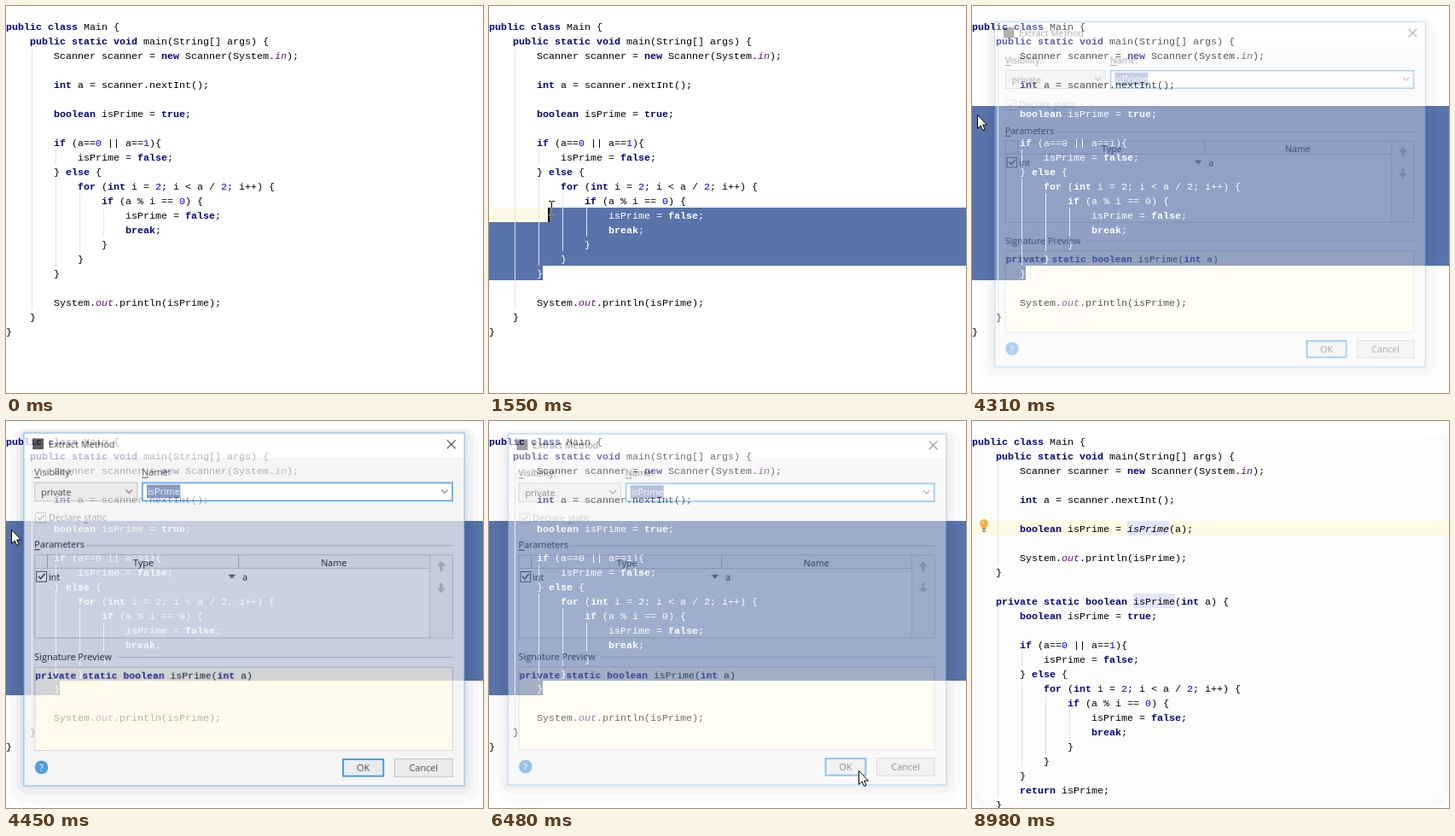
Animation of 559 by 453 pixels, one loop 9.04 s. Source, as an HTML page with a canvas:

```html
<!DOCTYPE html>
<html lang="en">
<head>
<meta charset="utf-8">
<title>Extract Method</title>
<style>
html, body { margin: 0; width: 100%; height: 100%; overflow: hidden; background: #fff; }
canvas { display: block; }
</style>
</head>
<body>
<canvas id="stage" width="559" height="453"></canvas>
<script>
const W = 559, H = 453, LOOP = 9040;
const COL = 7, ROW = 17, TOP = 15;
const MONO = '11.67px "Liberation Mono", monospace';
const UI = '11.1px "Open Sans", "Noto Sans", sans-serif';
const NAVY = '#000080', BLUE = '#5974ab', YELLOW = '#fffae3', FOCUS = '#0078d7';
const ctx = document.getElementById('stage').getContext('2d');

const head = [
  'public class Main {',
  '    public static void main(String[] args) {',
  '        Scanner scanner = new Scanner(System.in);',
  '',
  '        int a = scanner.nextInt();',
  ''
];
const body = [
  '        boolean isPrime = true;',
  '',
  '        if (a==0 || a==1){',
  '            isPrime = false;',
  '        } else {',
  '            for (int i = 2; i < a / 2; i++) {',
  '                if (a % i == 0) {',
  '                    isPrime = false;',
  '                    break;',
  '                }',
  '            }',
  '        }'
];
const print = '        System.out.println(isPrime);';
const before = {
  lines: [...head, ...body, '', print, '    }', '}'],
  // x, first row, last row
  guides: [[30, 2, 19], [58, 9, 9], [58, 11, 16], [86, 12, 15], [114, 13, 14]]
};
const after = {
  lines: [...head, '        boolean isPrime = isPrime(a);', '', print, '    }', '',
    '    private static boolean isPrime(int a) {', ...body,
    '        return isPrime;', '    }'],
  guides: [[30, 2, 8], [30, 12, 24], [58, 15, 15], [58, 17, 22], [86, 18, 21], [114, 19, 20]]
};

const TOKEN = /\b(public|class|static|void|new|int|boolean|true|false|if|else|for|break|return|private)\b|\b(in|out)\b|\b(\d)\b|(isPrime(?=\(a))|[^\s\w]+|\w+/g;
const rowY = r => TOP + r * ROW;

function rect(g, color, x, y, w, h) {
  g.fillStyle = color;
  g.fillRect(x, y, w, h);
}

function frame(g, fill, border, x, y, w, h, t = 1) {
  rect(g, border, x, y, w, h);
  rect(g, fill, x + t, y + t, w - 2 * t, h - 2 * t);
}

function line(g, color, width, ...pts) {
  g.strokeStyle = color;
  g.lineWidth = width;
  g.beginPath();
  for (let i = 0; i < pts.length; i += 2) g.lineTo(pts[i], pts[i + 1]);
  g.stroke();
}

function shape(g, color, ...pts) {
  g.fillStyle = color;
  g.beginPath();
  for (let i = 0; i < pts.length; i += 2) g.lineTo(pts[i], pts[i + 1]);
  g.closePath();
  g.fill();
}

function round(g, color, x, y, w, h, r) {
  g.fillStyle = color;
  g.beginPath();
  g.roundRect(x, y, w, h, r);
  g.fill();
}

function codeLine(g, text, x, y, color) {
  g.textAlign = 'left';
  g.textBaseline = 'alphabetic';
  for (const m of text.matchAll(TOKEN)) {
    const [word, key, field, num, call] = m;
    g.font = (key ? 'bold ' : field || call ? 'italic ' : '') + MONO;
    g.fillStyle = color || (key ? NAVY : field ? '#660e7a' : num ? '#0000ff' : '#000');
    g.fillText(word, x + m.index * COL, y);
  }
}

function drawCode(code, color) {
  for (const [x, a, b] of code.guides)
    rect(ctx, color ? '#e0e4ee' : '#e2e2e2', x, rowY(a), 1, (b - a + 1) * ROW);
  code.lines.forEach((s, r) => codeLine(ctx, s, 0, rowY(r) + 13, color));
}

// Selection runs from the caret down to the end of row 17.
function select(row, x) {
  const y = rowY(row), last = rowY(17);
  ctx.save();
  ctx.beginPath();
  if (row < 17) {
    ctx.rect(x, y, W, ROW);
    ctx.rect(0, y + ROW, W, last - y - ROW);
    ctx.rect(0, last, 63, ROW);
  } else {
    ctx.rect(x, y, 63 - x, ROW);
  }
  ctx.clip();
  rect(ctx, BLUE, 0, 0, W, H);
  drawCode(before, '#fff');
  ctx.restore();
}

const caret = (row, x) => rect(ctx, '#000', x, rowY(row), 2, ROW);

function bulb() {
  ctx.fillStyle = '#f4b04a';
  ctx.beginPath();
  ctx.arc(14, 120, 5, 0, 7);
  ctx.fill();
  rect(ctx, '#f4b04a', 11.5, 123, 5, 3);
  rect(ctx, '#fbdc9c', 12, 117, 2, 3);
  rect(ctx, '#6e6e6e', 12, 126, 4, 1);
  rect(ctx, '#8a8a8a', 12, 128, 4, 1);
  rect(ctx, '#6e6e6e', 13, 129, 2, 1);
}

function beam(x, y) {
  ctx.save();
  ctx.globalCompositeOperation = 'difference';
  rect(ctx, '#fff', x, y - 7, 1, 15);
  for (const dy of [-8, 8]) {
    rect(ctx, '#fff', x - 3, y + dy, 3, 1);
    rect(ctx, '#fff', x + 1, y + dy, 3, 1);
  }
  ctx.restore();
}

function arrow(x, y) {
  ctx.save();
  ctx.translate(x + .5, y + .5);
  const p = [0, 0, 0, 16, 3.7, 12.6, 6.2, 18, 8.6, 17, 6.2, 11.6, 11, 11.6];
  shape(ctx, '#fff', ...p);
  line(ctx, '#000', 1, ...p, 0, 0);
  ctx.restore();
}

function label(g, text, x, y, color = '#000', align = 'left') {
  g.font = UI;
  g.fillStyle = color;
  g.textAlign = align;
  g.textBaseline = 'alphabetic';
  g.fillText(text, x, y + 4);
}

// Label with an underlined mnemonic letter.
function hot(g, text, x, y, at = 0, color = '#000') {
  label(g, text, x, y, color);
  const from = g.measureText(text.slice(0, at)).width;
  rect(g, color, Math.round(x + from), y + 6, Math.round(g.measureText(text[at]).width), 1);
}

const chevron = (g, x, y) => line(g, '#444', 1.1, x - 4, y - 2, x, y + 2, x + 4, y - 2);

function makeDialog() {
  const c = document.createElement('canvas');
  c.width = W;
  c.height = H;
  const g = c.getContext('2d');
  round(g, 'rgba(0,0,0,.045)', 0, 4, 559, 448, 20);
  round(g, 'rgba(0,0,0,.05)', 7, 7, 545, 434, 14);
  round(g, 'rgba(0,0,0,.06)', 12, 9, 534, 425, 8);
  frame(g, '#f2f2f2', '#4d9fdc', 16, 10, 526, 421);
  rect(g, '#fff', 17, 11, 524, 29);
  rect(g, '#222', 27, 17, 13, 13);
  label(g, 'Extract Method', 46, 24);
  line(g, '#000', 1.1, 521, 19, 531, 29);
  line(g, '#000', 1.1, 531, 19, 521, 29);

  hot(g, 'Visibility:', 29, 57);
  hot(g, 'Name:', 157, 57);
  frame(g, '#e3e3e3', '#adadad', 29, 69, 123, 23);
  label(g, 'private', 37, 81);
  chevron(g, 142, 80);
  frame(g, '#fff', FOCUS, 157, 69, 371, 23, 1.5);
  rect(g, BLUE, 163, 72, 40, 16);
  label(g, 'isPrime', 164, 80, '#fff');
  chevron(g, 518, 80);
  frame(g, '#f5f5f5', '#bcbcbc', 30, 105, 13, 13);
  line(g, '#a0a0a0', 1.3, 33, 111, 35.5, 114, 40.5, 108);
  hot(g, 'Declare static', 46, 111, 8, '#8c8c8c');

  hot(g, 'Parameters', 29, 143);
  rect(g, '#bdbdbd', 90, 144, 438, 1);
  frame(g, '#f5f5f5', '#bebebe', 29, 155, 472, 100);
  rect(g, '#efefef', 30, 156, 470, 15);
  rect(g, '#bebebe', 30, 171, 470, 1);
  rect(g, '#a8a8a8', 44, 156, 1, 15);
  rect(g, '#a8a8a8', 272, 156, 1, 15);
  label(g, 'Type', 159, 165, '#000', 'center');
  label(g, 'Name', 386, 165, '#000', 'center');
  frame(g, '#fff', '#333', 31, 175, 13, 13);
  line(g, '#000', 1.3, 34, 181, 36.5, 184, 41.5, 178);
  label(g, 'int', 46, 182);
  shape(g, '#555', 260, 179, 269, 179, 264.5, 184);
  label(g, 'a', 277, 182);
  frame(g, '#efefef', '#c6c6c6', 500, 155, 28, 100);
  for (const [y, d] of [[169, 1], [195, -1]]) {
    shape(g, '#b4b4b4', 514, y - 6 * d, 519.5, y, 508.5, y);
    rect(g, '#b4b4b4', 512.5, d > 0 ? y : y - 6, 3, 6);
  }

  label(g, 'Signature Preview', 29, 277);
  rect(g, '#bdbdbd', 127, 277, 401, 1);
  frame(g, '#fff9e4', '#c4c4c4', 29, 289, 499, 100);
  codeLine(g, 'private static boolean isPrime(int  a)'.replace('  ', ' '), 30, 303);

  g.fillStyle = '#1278cf';
  g.beginPath();
  g.arc(37.5, 408.5, 8, 0, 7);
  g.fill();
  label(g, '?', 37.5, 408.5, '#fff', 'center');
  frame(g, '#e3e3e3', FOCUS, 396, 398, 50, 22, 2);
  label(g, 'OK', 421, 409, '#000', 'center');
  frame(g, '#e3e3e3', '#adadad', 458, 398, 70, 22);
  label(g, 'Cancel', 493, 409, '#000', 'center');
  return c;
}
const dialog = makeDialog();

const STEP = 73.4;
const tick = (t, t0) => Math.floor((t - t0) / STEP + .02);

function along(pts, t, t0) {
  t = t0 + tick(t, t0) * STEP;
  let i = 0;
  while (i < pts.length - 2 && t >= pts[i + 1][0]) i++;
  const [ta, xa, ya] = pts[i], [tb, xb, yb] = pts[i + 1];
  const k = Math.min(1, Math.max(0, (t - ta) / (tb - ta)));
  return [Math.round(xa + (xb - xa) * k), Math.round(ya + (yb - ya) * k)];
}

const enter = [[370, 390, 430], [955, 164, 317]];
const drag = [[1040, 164, 317], [1250, 66, 312], [1330, 64, 312], [1545, 74, 237], [1690, 50, 214], [1840, 6, 180], [1900, -10, 176]];
const toOk = [[5000, 6, 127], [5360, 195, 219], [5650, 392, 398], [5800, 414, 421], [5945, 435, 409], [6020, 433, 409]];
const leave = [[8160, 433, 409], [8370, 457, 432]];

function fade(t) {
  if (t < 4310 || t >= 6620) return 0;
  if (t < 6400) return [.35, .72, .93, 1][Math.min(3, tick(t, 4310))];
  return [.8, .45, .18][Math.min(2, tick(t, 6400))];
}

function drawBefore(t) {
  const pos = t >= 1110 ? along(drag, t, 1110) : null;
  let row = -1, x = 0;
  if (t >= 2930) row = 6;
  else if (t >= 2450) row = 7;
  else if (t >= 2140) row = 8;
  else if (t >= 1330) {
    row = Math.max(9, Math.min(17, Math.floor((pos[1] - TOP) / ROW)));
    x = row === 17 ? 63 : Math.max(0, Math.floor(pos[0] / COL) * COL);
  }
  if (row >= 0) rect(ctx, YELLOW, 0, rowY(row), row === 17 ? W : x, ROW);
  drawCode(before);
  if (row >= 0) {
    select(row, x);
    if (t < 4080) caret(row, x ? x - 1 : 0);
  }
  if (t >= 4000 && t < 4310) bulb();
  if (t >= 370 && t < 1110) beam(...along(enter, t, 370));
  else if (pos && t < 1910) beam(...pos);
}

function drawAfter(t) {
  if (t >= 6620) {
    // faint trace left by the closed window
    round(ctx, '#f9f9f9', 0, 4, 559, 448, 20);
    round(ctx, '#fcfcfa', 6, 8, 546, 436, 14);
    rect(ctx, '#fff', 0, 0, W, 16);
    rect(ctx, '#fefefe', 16, 16, 516, 24);
  }
  rect(ctx, YELLOW, 0, rowY(6), W, ROW);
  if (t >= 6780) {
    rect(ctx, '#e4e4ff', 182, rowY(6), 49, ROW);
    rect(ctx, '#e4e4ff', 189, rowY(11), 49, ROW);
  }
  drawCode(after);
  if (t < 7380 || (t >= 8000 && t < 8460) || (t >= 8900 && t < 8980)) caret(6, 181);
  if (t >= 7460) bulb();
}

function draw(t) {
  rect(ctx, '#fff', 0, 0, W, H);
  (t < 6550 ? drawBefore : drawAfter)(t);

  const a = fade(t);
  if (a) {
    const s = t < 6400 ? 1 - (1 - a) * .06 : 1 - (1 - a) * .04;
    ctx.save();
    ctx.globalAlpha = a;
    ctx.translate(279, 220);
    ctx.scale(s, s);
    ctx.drawImage(dialog, -279, -220);
    ctx.restore();
  }
  const blink = (t >= 4530 && t < 4760) || (t >= 5260 && t < 5760) || (t >= 6260 && t < 6400);
  if (blink) rect(ctx, '#000', 203, 72, 1, 16);

  if (t >= 8460) return;
  if (t >= 8230) arrow(...along(leave, t, 8230));
  else if (t >= 6030) arrow(433, 409);
  else if (t >= 5070) arrow(...along(toOk, t, 5070));
  else if (t >= 3460) arrow(6, 127);
}

const start = performance.now();
function loop() {
  draw((performance.now() - start) % LOOP);
  requestAnimationFrame(loop);
}
loop();
</script>
</body>
</html>
```
